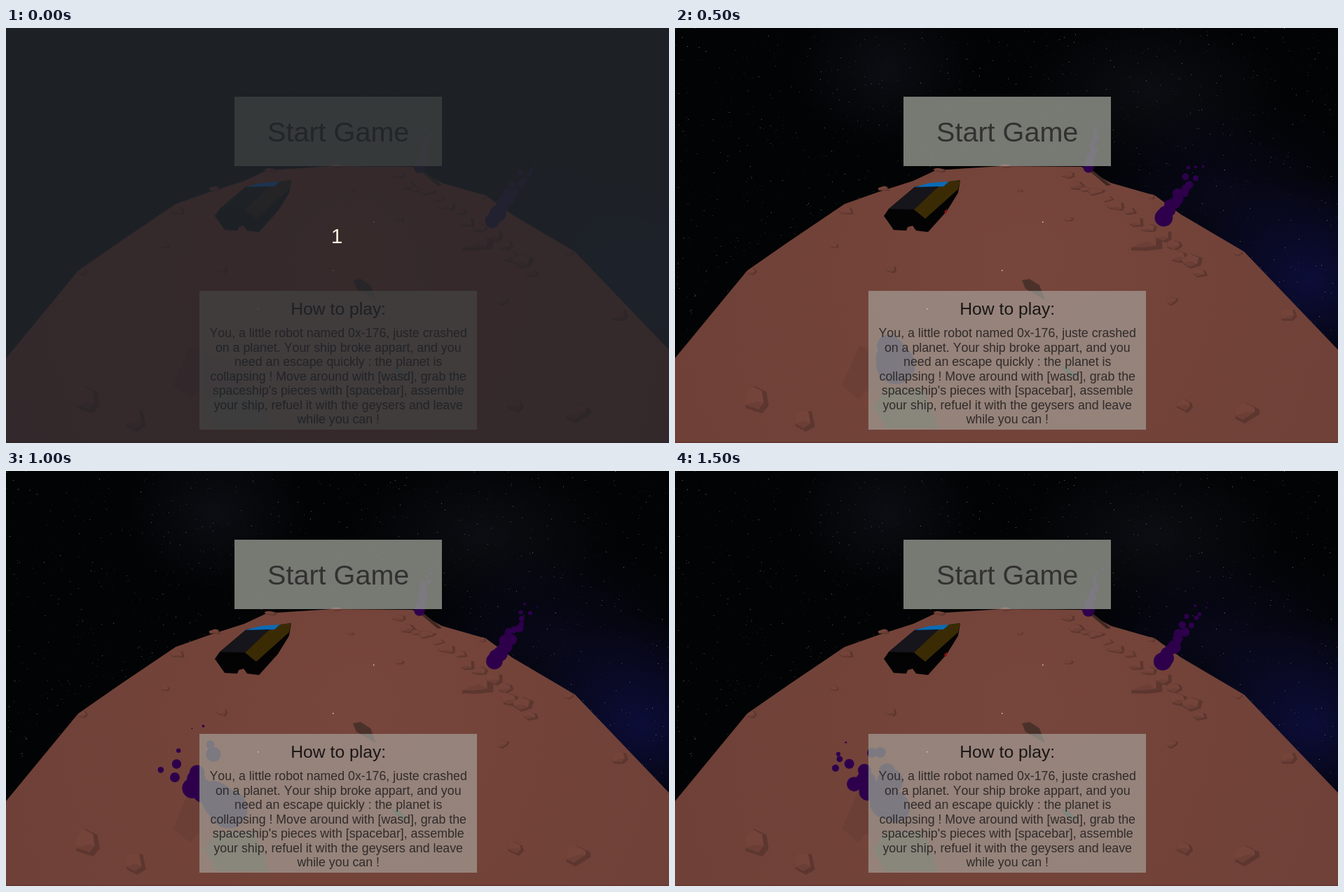
Animation, 946 px wide and 592 px high, one loop 8 s. Source, as an HTML page with a canvas:

```html
<!DOCTYPE html>
<html lang="en">
<head>
<meta charset="utf-8">
<title>Start Game</title>
<style>
html, body { margin: 0; width: 100%; height: 100%; overflow: hidden; background: #000; }
canvas { display: block; }
</style>
</head>
<body>
<canvas id="stage" width="946" height="592"></canvas>
<script>
const W = 946, H = 592, LOOP = 8000, STEP = 100, LAST = 15;
const ctx = document.getElementById('stage').getContext('2d', { willReadFrequently: true });

function random(seed) {
  return () => (seed = (seed * 16807) % 2147483647) / 2147483647;
}

function poly(c, color, pts) {
  c.fillStyle = color;
  c.beginPath();
  for (let i = 0; i < pts.length; i += 2) c.lineTo(pts[i], pts[i + 1]);
  c.fill();
}

function glow(c, x, y, rx, ry, rgb, alpha) {
  c.save();
  c.translate(x, y);
  c.scale(rx, ry);
  const g = c.createRadialGradient(0, 0, 0, 0, 0, 1);
  g.addColorStop(0, `rgba(${rgb},${alpha})`);
  g.addColorStop(1, `rgba(${rgb},0)`);
  c.fillStyle = g;
  c.fillRect(-1, -1, 2, 2);
  c.restore();
}

function sky(c) {
  c.fillStyle = '#020304';
  c.fillRect(0, 0, W, H);
  glow(c, 300, 60, 130, 110, '30,32,48', .35);
  glow(c, 680, 90, 190, 110, '28,32,46', .35);
  glow(c, 780, 240, 210, 140, '14,14,48', .5);
  glow(c, 905, 360, 180, 150, '16,16,74', .75);
  const rnd = random(77);
  for (let i = 0; i < 2200; i++) {
    c.fillStyle = `rgba(180,186,182,${.08 + .5 * rnd() ** 4})`;
    c.fillRect(Math.floor(rnd() * W), Math.floor(rnd() * 475), 1, 1);
  }
}

// Angular stone, flatter towards the horizon.
function rock(c, x, y, w, rnd) {
  const h = w * Math.min(.9, .42 + (y - 200) / 700);
  const rim = [], top = [];
  for (let i = 0; i < 6; i++) {
    const a = i * Math.PI / 3 + rnd() * .8, k = .36 + rnd() * .2;
    const dx = Math.cos(a) * w * k, dy = Math.sin(a) * h * k;
    rim.push(x + dx, y + dy);
    top.push(x - w * .08 + dx * .8, y - h * .08 + dy * .84);
  }
  poly(c, '#5c362f', rim);
  poly(c, '#74443a', top);
  poly(c, '#6c3f36', [x, y, ...top.slice(0, 6)]);
}

function rocks(c) {
  const rnd = random(2024);
  const stones = [
    [110, 348, 18], [298, 229, 20], [378, 203, 20], [472, 197, 16], [680, 241, 15], [805, 322, 14],
    [246, 262, 24], [228, 311, 15], [309, 345, 18], [492, 232, 10], [562, 273, 14], [710, 390, 18],
    [876, 410, 28], [117, 533, 46], [185, 560, 38], [728, 538, 26], [815, 548, 38], [675, 304, 60]
  ];
  for (const [x, y, w] of stones) rock(c, x, y, w, rnd);
  // rubble curving down past the two far geysers
  for (let i = 0; i < 14; i++) {
    const t = i / 13;
    rock(c, 552 + 195 * t + rnd() * 16, 210 + 135 * t ** 1.3 + rnd() * 10, 18 + rnd() * 18, rnd);
  }
}

function planet(c) {
  const g = c.createRadialGradient(500, 330, 40, 500, 400, 530);
  g.addColorStop(0, '#76453b');
  g.addColorStop(1, '#6e4037');
  poly(c, g, [0,471, 103,346, 162,305, 242,251, 290,234, 340,218, 372,203, 465,197,
    580,198, 622,221, 685,239, 722,266, 812,319, 946,459, 946,592, 0,592]);
  c.fillStyle = '#663a32';
  c.fillRect(0, 590, W, 2);
  rocks(c);
  poly(c, '#3f2822', [590,203, 597,204, 622,224, 616,225]);
  poly(c, '#4a322b', [495,360, 506,358, 520,367, 528,388, 500,372]);
  poly(c, '#6c3f36', [263,453, 238,510, 262,530, 274,516, 300,566, 350,488]);
  poly(c, '#59503f', [284,540, 300,515, 355,515, 376,571, 300,571]);
  poly(c, '#3d5044', [549,481, 562,486, 576,499, 562,496]);
  c.fillStyle = '#e0cfc0';
  for (const [x, y] of [[467, 346], [525, 277], [360, 401]]) c.fillRect(x - 1, y - 1, 1.5, 1.5);
}

function ship(c) {
  poly(c, '#030304', [298,268, 305,258, 343,226, 407,217, 404,235, 388,261, 361,291,
    344,289, 339,282, 332,284, 330,289, 312,288]);
  poly(c, '#16151b', [305,258, 343,226, 375,227, 341,259]);
  poly(c, '#3a2b05', [341,259, 375,227, 390,219, 407,217, 404,230, 357,272]);
  poly(c, '#0b6bb5', [341,227, 364,221, 391,219, 383,226]);
}

// base, axis, puff radius, sideways spread, count, time of first puff
const GEYSERS = [
  { x: 590, y: 199, ax: 20, ay: -84, r: 8, spread: 18, count: 14, start: -9 },
  { x: 694, y: 275, ax: 66, ay: -98, r: 12, spread: 30, count: 18, start: -9 },
  { x: 318, y: 483, ax: -78, ay: -104, r: 25, spread: 110, count: 19, start: .3 }
];
const LIFE = .7;

// Each puff rises along the axis, drifts sideways, shrinks and is born again.
function smoke(g, sec) {
  const rnd = random(g.x);
  const len = Math.hypot(g.ax, g.ay);
  ctx.fillStyle = '#2e004c';
  for (let i = 0; i < g.count; i++) {
    const u = (sec / LIFE + 20 + i / g.count) % 1;
    const drift = (rnd() - .5) * g.spread * u / len;
    const r = g.r * (.75 + rnd() * .4) * (1 - u ** .9);
    if (sec - u * LIFE < g.start) continue;
    ctx.beginPath();
    ctx.arc(g.x + g.ax * u - g.ay * drift, g.y + g.ay * u + g.ax * drift, r, 0, 7);
    ctx.fill();
  }
}

// Tints an area in linear light: scales what lies below and adds a colour.
function glass(x, y, w, h, keep, tint) {
  const lin = v => (v / 255) ** 2.2;
  const maps = tint.map(t => Uint8ClampedArray.from({ length: 256 },
    (_, v) => Math.min(255, 255 * (lin(v) * keep + lin(t)) ** (1 / 2.2))));
  const img = ctx.getImageData(x, y, w, h);
  for (let i = 0; i < img.data.length; i += 4) {
    for (let k = 0; k < 3; k++) img.data[i + k] = maps[k][img.data[i + k]];
  }
  ctx.putImageData(img, x, y);
}

function text(str, x, y, px, color) {
  ctx.font = `${px}px "Liberation Sans", Arial, sans-serif`;
  ctx.fillStyle = color;
  ctx.fillText(str, x, y);
}

const HELP = [
  'You, a little robot named 0x-176, juste crashed',
  'on a planet. Your ship broke appart, and you',
  'need an escape quickly : the planet is',
  'collapsing ! Move around with [wasd], grab the',
  "spaceship's pieces with [spacebar], assemble",
  'your ship, refuel it with the geysers and leave',
  'while you can !'
];

function menu() {
  const grey = [119, 121, 115];
  glass(326, 98, 296, 99, .69, grey);
  glass(276, 375, 396, 198, .69, grey);
  text('Start Game', 474.2, 162, 39.6, '#323130');
  text('How to play:', 474.2, 409, 24.7, '#191615');
  HELP.forEach((line, i) => text(line, 474.2, 441 + i * 20.5, 17.78, '#302b2a'));
}

const scene = document.createElement('canvas');
scene.width = W;
scene.height = H;
for (const part of [sky, planet, ship]) part(scene.getContext('2d'));

ctx.textAlign = 'center';
ctx.fontKerning = 'none';

function draw(step) {
  ctx.drawImage(scene, 0, 0);
  const blink = (step + 7) % 8 >= 4;
  if (blink && step) poly(ctx, '#8c1013', [384,262, 388,258, 388,263, 385,265]);
  for (const g of GEYSERS) smoke(g, step * STEP / 1000);
  menu();
  if (step === 0) {
    glass(0, 0, W, H, .13, [29, 33, 38]);
    text('1', 472, 307, 30, '#fff0e0');
  }
}

let shown = -1;
function tick() {
  const step = Math.min(LAST, Math.floor(performance.now() % LOOP / STEP));
  if (step !== shown) draw(shown = step);
  requestAnimationFrame(tick);
}
tick();
</script>
</body>
</html>
```
